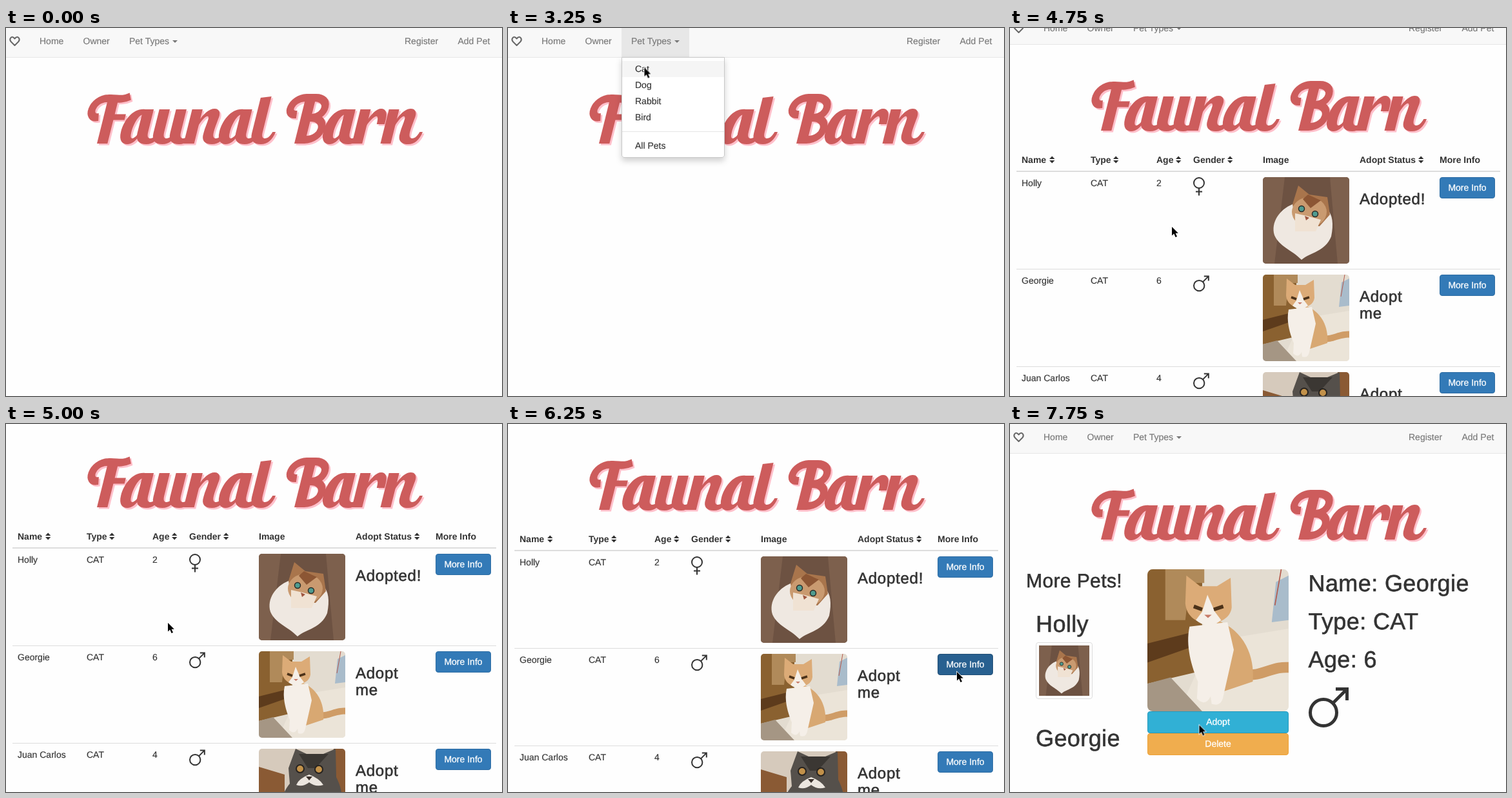
Animation, 769 px wide and 570 px high, one loop 8000 ms. Source, as an HTML page:

```html
<!DOCTYPE html>
<html lang="en">
<head>
<meta charset="utf-8">
<title>Faunal Barn</title>
<style>
  html, body { margin: 0; width: 100%; height: 100%; overflow: hidden; background: #fefefe; }
  svg.stage { display: block; width: 769px; height: 570px; }
  text {
    font: 14px "Liberation Sans", Arial, sans-serif;
    fill: #333; stroke: #333; stroke-width: .15px;
    text-rendering: geometricPrecision;
  }
  .nav text { fill: #777; stroke: #777; }
  .head text { font-weight: 700; stroke: none; }
  .label { fill: #fff; stroke: #fff; stroke-width: .3px; text-anchor: middle; }
  .h1, .h2, .h3 { stroke-width: .6px; letter-spacing: .4px; }
  .h1 { font-size: 36px; }
  .h2 { font-size: 30px; }
  .h3 { font-size: 24px; letter-spacing: .75px; }
  .line { fill: none; stroke: currentColor; }
  .blue { fill: #337ab7; stroke: #2e6da4; }

  .page, .cursor, .home, .menu, .cat, .list, .detail, .info, .del, .adopt {
    animation: 8s step-end infinite;
  }
  .page { animation-name: scroll; }
  .cursor { animation-name: move; }
  .home { animation-name: home; }
  .menu { animation-name: menu; }
  .cat { animation-name: cat; }
  .list { animation-name: list; }
  .detail { animation-name: detail; }
  .info { animation-name: info; }
  .del { animation-name: del; }
  .adopt { animation-name: adopt; }

  @keyframes scroll {
    0% { transform: translateY(0); }
    59.375% { transform: translateY(-20px); }
    62.5% { transform: translateY(-50px); }
    65.625% { transform: translateY(-47px); }
    68.75% { transform: translateY(-46px); }
    84.375%, 100% { transform: translateY(0); }
  }
  @keyframes move {
    0% { transform: translate(-30px, -30px); }
    6.25% { transform: translate(201px, 98px); }
    9.375% { transform: translate(187px, 111px); }
    12.5% { transform: translate(211px, 50px); }
    15.625% { transform: translate(213px, 28px); }
    37.5% { transform: translate(211px, 60px); }
    40.625% { transform: translate(211.5px, 61.5px); }
    53.125% { transform: translate(251px, 308px); }
    65.625% { transform: translate(500px, 340px); }
    68.75% { transform: translate(717px, 370px); }
    75% { transform: translate(717px, 385px); }
    78.125% { transform: translate(696px, 384px); }
    90.625% { transform: translate(335px, 492px); }
    93.75% { transform: translate(308px, 486px); }
    96.875%, 100% { transform: translate(293.5px, 466.5px); }
  }
  @keyframes home {
    0% { fill: #777; stroke: #777; }
    18.75% { fill: #333; stroke: #333; }
    31.25%, 100% { fill: #777; stroke: #777; }
  }
  @keyframes menu { 0% { opacity: 0; } 31.25% { opacity: 1; } 46.875%, 100% { opacity: 0; } }
  @keyframes cat { 0% { opacity: 0; } 37.5%, 100% { opacity: 1; } }
  @keyframes list { 0% { opacity: 0; } 46.875% { opacity: 1; } 84.375%, 100% { opacity: 0; } }
  @keyframes detail { 0% { opacity: 0; } 84.375%, 100% { opacity: 1; } }
  @keyframes info {
    0% { fill: #337ab7; stroke: #2e6da4; }
    71.875%, 100% { fill: #286090; stroke: #204d74; }
  }
  @keyframes del {
    0% { fill: #f0ad4e; stroke: #eea236; }
    90.625% { fill: #ec971f; stroke: #d58512; }
    96.875%, 100% { fill: #f0ad4e; stroke: #eea236; }
  }
  @keyframes adopt {
    0% { fill: #5bc0de; stroke: #46b8da; }
    96.875%, 100% { fill: #31b0d5; stroke: #269abc; }
  }
</style>
</head>
<body>
<svg class="stage" viewBox="0 0 769 570">
  <defs>
    <!-- script lettering, upright, baseline at 0 -->
    <path id="hook" d="M0-53H17V-18C17-10 20-8 23-8C28-8 31-12 33-18L38-18C36-6 30 1 19 1C7 1 0-5 0-16Z"/>
    <path id="stem" d="M0-53H17V0H0Z"/>
    <g id="gA">
      <path d="M30-53C10-55 0-36 0-18C0-5 7 1 15 1C23 1 28-5 31-12V-20C28-13 24-8 21-8C18-8 17-12 17-18C17-30 22-45 29-45Z"/>
      <use href="#hook" x="27"/>
    </g>
    <g id="gU"><use href="#hook"/><use href="#hook" x="27"/></g>
    <g id="gN">
      <use href="#stem"/>
      <path d="M15-34C20-46 27-54 36-54C45-54 48-46 46-38C45-30 44-24 44-18C44-10 47-8 50-8C55-8 58-12 60-18L65-18C63-6 57 1 46 1C34 1 27-5 28-16C28-25 30-32 30-38C30-42 28-43 26-42C22-40 18-32 15-24Z"/>
    </g>
    <path id="gL" d="M0-71L17-73V-18C17-10 20-8 23-8C28-8 31-12 33-18L38-18C36-6 30 1 19 1C7 1 0-5 0-16Z"/>
    <g id="gR">
      <use href="#stem"/>
      <path d="M15-34C20-46 26-54 34-54C42-54 46-47 46-38V-30H33C33-38 32-43 28-42C23-40 18-32 15-24Z"/>
    </g>
    <g id="gF">
      <path d="M0-70H17V0H0Z"/>
      <path class="line" stroke-width="12" d="M-8-41C-28-37-27-69-1-70C14-71 20-66 35-73"/>
      <path class="line" stroke-width="9" d="M14-41H35"/>
    </g>
    <g id="gB">
      <path d="M0-70H17V0H0Z"/>
      <path class="line" stroke-width="12" d="M-8-45C-28-43-24-70 0-71H14C43-72 42-41 16-40C47-41 45-6 16-6H4"/>
    </g>
    <g id="title" fill="currentColor">
      <g transform="translate(141 179) skewX(-14) scale(.96 1)">
        <use href="#gF"/><use href="#gA" x="34"/><use href="#gU" x="87"/>
        <use href="#gN" x="140"/><use href="#gA" x="193"/><use href="#gL" x="246"/>
      </g>
      <g transform="translate(447 179) skewX(-14) scale(.94 1)">
        <use href="#gB"/><use href="#gA" x="43"/><use href="#gR" x="95"/><use href="#gN" x="142"/>
      </g>
    </g>

    <path id="sort" fill="#333" d="M0 4.5L4.2 0L8.4 4.5ZM0 6.5H8.4L4.2 11Z"/>
    <g id="male" fill="none" stroke="#333" stroke-width="5">
      <circle cx="23" cy="39" r="20.5"/>
      <path d="M38 24L58 4M42 2.5H59.5V20"/>
    </g>
    <g id="female" fill="none" stroke="#333" stroke-width="2">
      <circle cx="9" cy="9.5" r="8"/>
      <path d="M9 17.5V29M4 23H14"/>
    </g>
    <g id="more">
      <rect x="666.5" y="9.5" width="85" height="32" rx="3.5"/>
      <text class="label" x="709" y="30">More Info</text>
    </g>

    <clipPath id="round"><rect width="134" height="134" rx="5"/></clipPath>
    <g id="holly">
      <path fill="#6d5242" d="M0 0H134V134H0Z"/>
      <path fill="#7d604d" d="M0 0H34L18 134H0ZM104 0H134V134H116Z"/>
      <path fill="#efe8e1" d="M46 42C26 50 12 70 18 90C26 108 44 112 60 128C74 116 96 116 106 92C110 72 108 58 100 50Z"/>
      <path fill="#a9754c" d="M46 42L55 13L72 27L100 31L104 58L88 76H52Z"/>
      <ellipse cx="72" cy="54" rx="27" ry="23" fill="#c99a70"/>
      <path fill="#f0e2d3" d="M50 56L68 60L90 66L82 84H50Z"/>
      <path fill="#8c5634" d="M62 34L70 27L90 36L74 48Z"/>
      <g fill="#4f9c90" stroke="#2a2a26" stroke-width="1.5">
        <circle cx="60" cy="49" r="4.5"/><circle cx="81" cy="57" r="4.5"/>
      </g>
      <path fill="#a0563f" d="M65 60L72 63L67 67Z"/>
    </g>
    <g id="georgie">
      <path fill="#e3dcd0" d="M0 0H134V134H0Z"/>
      <path fill="#ebe4d8" d="M60 68L134 56V134H30Z"/>
      <path fill="#8a6130" d="M0 0H52V70L68 92L0 108Z"/>
      <path fill="#b08a5a" d="M17 0H54V13H40L36 48H17Z"/>
      <path fill="#5d3b1c" d="M0 70L40 60V74L0 88Z"/>
      <path fill="#a59684" d="M0 108L22 102L52 134H0Z"/>
      <path fill="#a9bccb" d="M122 12L134 6V48L118 50Z"/>
      <path fill="none" stroke="#b4584a" d="M127 0L121 34"/>
      <path fill="none" stroke="#cf9c66" stroke-width="10" d="M92 99C110 102 118 90 138 93"/>
      <path fill="#d8a872" d="M66 48C92 58 102 82 100 106L64 118Z"/>
      <path fill="#f5efe8" d="M40 54C36 72 42 92 48 106L47 122Q55 130 60 120L61 127Q70 130 72 120L82 76L76 50Z"/>
      <path fill="#dcab77" d="M36 32L37 6L50 16H66L79 8L80 36C78 56 38 58 36 32Z"/>
      <path fill="#f5efe8" d="M57 24L64 40L70 48Q58 58 46 48L52 40Z"/>
      <path fill="none" stroke="#4c3219" stroke-width="3.5" d="M44 35L52 38M63 38L72 35"/>
      <path fill="#c77a68" d="M54 43H61L57.5 46Z"/>
    </g>
    <g id="juan">
      <path fill="#d6cabc" d="M0 0H134V134H0Z"/>
      <path fill="#8a5a34" d="M0 28L40 40V134H0ZM116 0H134V134H110Z"/>
      <path fill="#55504b" d="M46 30L57 0L74 8H100L119 0L120 44C134 70 130 100 130 134H28C28 100 34 70 48 54Z"/>
      <path fill="#3b3733" d="M62 8H108L88 30H76Z"/>
      <g fill="#c2914a" stroke="#26221f" stroke-width="2">
        <circle cx="64" cy="31" r="6"/><circle cx="93" cy="32" r="6"/>
      </g>
      <path fill="#ece6df" d="M78 40Q94 46 100 56Q88 60 78 52Q68 60 58 56Q62 46 78 40Z"/>
      <path fill="#3a302b" d="M73 43H83L78 49Z"/>
    </g>
    <filter id="shade" x="-10%" y="-10%" width="120%" height="125%">
      <feDropShadow dx="0" dy="5" stdDeviation="5" flood-opacity=".18"/>
    </filter>
  </defs>

  <g class="page">
    <g class="nav">
      <path fill="#f8f8f8" d="M0 0H769V45H0Z"/>
      <path fill="#e7e7e7" d="M0 45H769V46H0Z"/>
      <path fill="none" stroke="#666" stroke-width="2" stroke-linejoin="round" d="M13.5 27L7.5 21C4.5 17 8 12.5 11.5 14.5L13.5 16.5L15.5 14.5C19 12.5 22.5 17 19.5 21Z"/>
      <text class="home" x="52" y="25">Home</text>
      <text x="119.5" y="25">Owner</text>
      <path class="menu" fill="#e7e7e7" d="M176 0H281V45H176Z"/>
      <text x="191" y="25">Pet Types</text>
      <path fill="#777" d="M258 19H266L262 23Z"/>
      <text x="618" y="25">Register</text>
      <text x="700.5" y="25">Add Pet</text>
    </g>

    <use href="#title" x="2.5" y="2.5" color="#ffc0cb"/>
    <use href="#title" color="#cd5c5c"/>

    <g class="list">
      <g class="head">
        <text x="18" y="229">Name</text><use href="#sort" x="61" y="218.5"/>
        <text x="125" y="229">Type</text><use href="#sort" x="160" y="218.5"/>
        <text x="227" y="229">Age</text><use href="#sort" x="257" y="218.5"/>
        <text x="284" y="229">Gender</text><use href="#sort" x="337" y="218.5"/>
        <text x="392" y="229">Image</text>
        <text x="542" y="229">Adopt Status</text><use href="#sort" x="633" y="218.5"/>
        <text x="666" y="229">More Info</text>
        <path fill="#ddd" d="M10 241H760V243H10ZM10 393H760V394H10ZM10 544H760V545H10Z"/>
      </g>
      <g transform="translate(0 242)">
        <text x="18" y="23">Holly</text><text x="125" y="23">CAT</text><text x="227" y="23">2</text>
        <use href="#female" x="284" y="8.5"/>
        <g transform="translate(392 9)" clip-path="url(#round)"><use href="#holly"/></g>
        <text class="h3" x="542" y="51">Adopted!</text>
        <use class="blue" href="#more"/>
      </g>
      <g transform="translate(0 393)">
        <text x="18" y="23">Georgie</text><text x="125" y="23">CAT</text><text x="227" y="23">6</text>
        <use href="#male" transform="translate(284 10.5) scale(.4)"/>
        <g transform="translate(392 9)" clip-path="url(#round)"><use href="#georgie"/></g>
        <text class="h3" x="542" y="51">Adopt</text><text class="h3" x="542" y="77">me</text>
        <use class="info" href="#more"/>
      </g>
      <g transform="translate(0 544)">
        <text x="18" y="23">Juan Carlos</text><text x="125" y="23">CAT</text><text x="227" y="23">4</text>
        <use href="#male" transform="translate(284 10.5) scale(.4)"/>
        <g transform="translate(392 9)" clip-path="url(#round)"><use href="#juan"/></g>
        <text class="h3" x="542" y="51">Adopt</text><text class="h3" x="542" y="77">me</text>
        <use class="blue" href="#more"/>
      </g>
    </g>

    <g class="detail">
      <text class="h2" x="25" y="253">More Pets!</text>
      <text class="h1" x="40" y="322">Holly</text>
      <rect x="40.5" y="338.5" width="87" height="87" rx="3.5" fill="#fff" stroke="#ddd"/>
      <use href="#holly" transform="translate(45 343) scale(.582)"/>
      <text class="h1" x="40" y="499">Georgie</text>
      <g transform="translate(213 225) scale(1.634 1.642)" clip-path="url(#round)"><use href="#georgie"/></g>
      <rect class="adopt" x="213.5" y="445.5" width="218" height="33" rx="3.5"/>
      <text class="label" x="322.5" y="466">Adopt</text>
      <rect class="del" x="213.5" y="479.5" width="218" height="33" rx="3.5"/>
      <text class="label" x="322.5" y="500">Delete</text>
      <text class="h1" x="462.5" y="259">Name: Georgie</text>
      <text class="h1" x="462.5" y="318">Type: CAT</text>
      <text class="h1" x="462.5" y="377">Age: 6</text>
      <use href="#male" x="463" y="408"/>
    </g>

    <g class="menu">
      <path filter="url(#shade)" fill="#fff" stroke="#c8c8c8" d="M176.5 45.5H335.5V197Q335.5 200.5 332 200.5H180Q176.5 200.5 176.5 197Z"/>
      <path class="cat" fill="#f5f5f5" d="M177 51H335V76H177Z"/>
      <path fill="#e5e5e5" d="M177 160H335V161H177Z"/>
      <text x="197" y="68">Cat</text>
      <text x="197" y="93">Dog</text>
      <text x="197" y="118">Rabbit</text>
      <text x="197" y="143">Bird</text>
      <text x="197" y="187">All Pets</text>
    </g>
  </g>

  <path class="cursor" fill="#000" stroke="#fff" stroke-width="1.5" paint-order="stroke" d="M0 0V13.5L3.2 10.6L5.6 16L8 15L5.6 9.8H9.8Z"/>
</svg>
</body>
</html>
```
